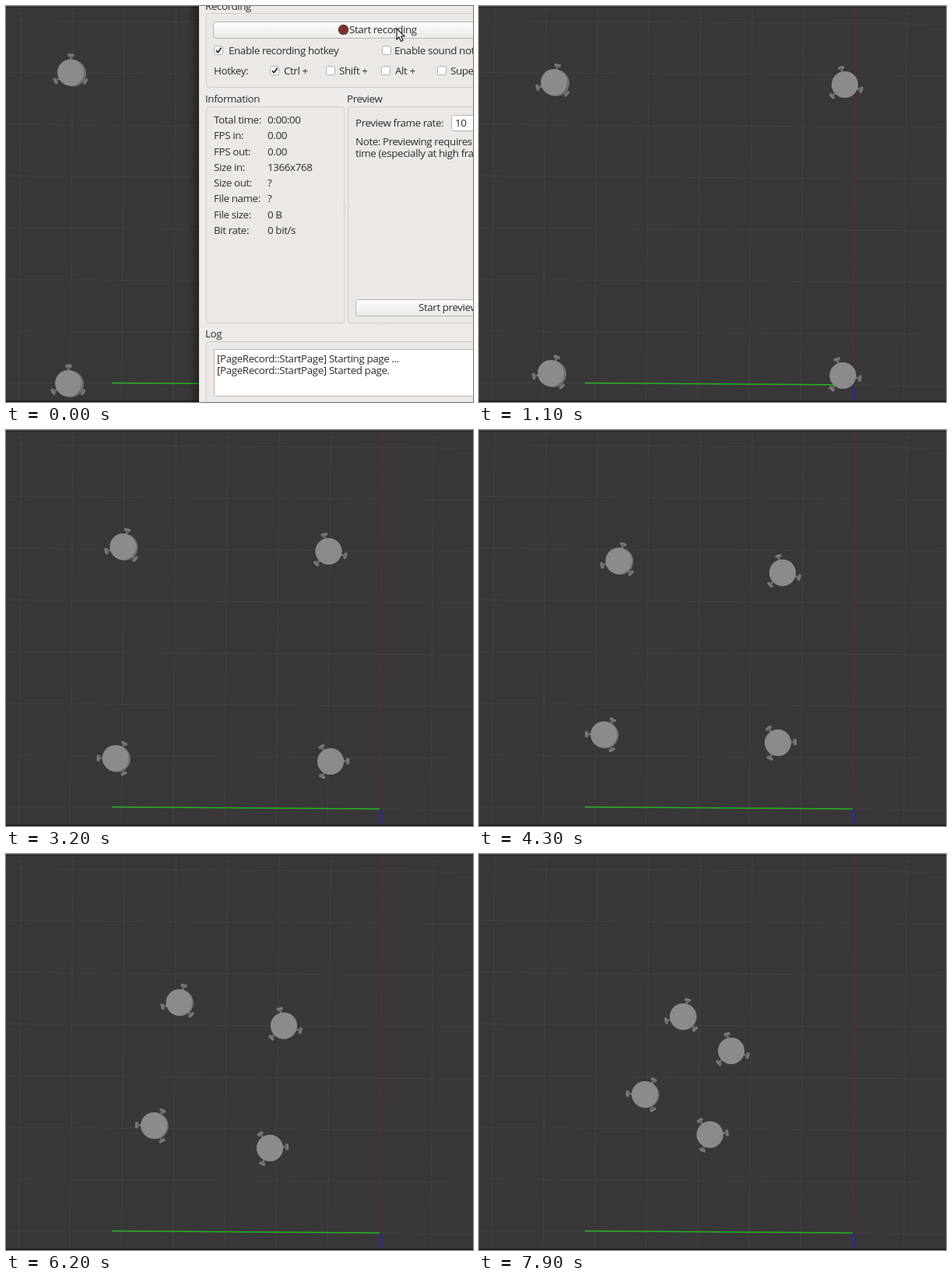
These frames come from a looping animation (600 px wide and 509 px high, 8000 ms). An HTML page with a canvas:

```html
<!DOCTYPE html>
<html lang="en">
<head>
<meta charset="utf-8">
<title>Robots converging</title>
<style>
html, body { margin: 0; width: 100%; height: 100%; overflow: hidden; background: #393739; }
canvas { display: block; }
</style>
</head>
<body>
<canvas id="stage" width="600" height="509"></canvas>
<script>
const ctx = document.getElementById('stage').getContext('2d');
const W = 600, H = 509, LOOP = 8000, STEP = 100;
const DIALOG_END = 100;

// Waypoints: x, y, heading in degrees at each key time
const TIMES = [0, 900, 1100, 1900, 3200, 4300, 6200, 7900];
const ROBOTS = [
  [[83, 85.5, -89], [92, 94, -80], [96.3, 98, -78], [114.3, 115.3, -76],
   [150.3, 150, -75], [179.5, 168.3, -75], [222.5, 190.7, -74], [262, 209, -74]],
  [[483, 87, -90], [474, 97, -101], [470, 101, -102], [451.5, 118, -103.5],
   [414.5, 156, -105], [390, 183.5, -104], [357, 220.7, -103.5], [324, 253, -104]],
  [[80, 485, -89], [88, 476, -74], [92.3, 472, -70], [107.3, 457, -61],
   [140.7, 422, -59], [160.3, 391.5, -58.5], [190, 349, -58.5], [213, 309, -58]],
  [[480, 487, -90], [471.5, 479, -106], [467.5, 475, -110], [453.5, 460, -118.5],
   [417, 426, -121], [384, 402, -122.5], [339, 378, -124], [296.5, 360.5, -125]]
];

function slope(path, i, k) {
  if (i === 0) return 0;
  const j = Math.min(i + 1, path.length - 1);
  return (path[j][k] - path[i - 1][k]) / (TIMES[j] - TIMES[i - 1]);
}

// Cubic Hermite through the waypoints
function poseAt(path, t) {
  let i = 0;
  while (i < TIMES.length - 2 && t >= TIMES[i + 1]) i++;
  const d = TIMES[i + 1] - TIMES[i];
  const u = Math.min(1, (t - TIMES[i]) / d), u2 = u * u, u3 = u2 * u;
  return [0, 1, 2].map(k =>
    (2 * u3 - 3 * u2 + 1) * path[i][k] + (u3 - 2 * u2 + u) * d * slope(path, i, k) +
    (3 * u2 - 2 * u3) * path[i + 1][k] + (u3 - u2) * d * slope(path, i + 1, k));
}

function line(x1, y1, x2, y2, color, width = 1) {
  ctx.strokeStyle = color;
  ctx.lineWidth = width;
  ctx.beginPath();
  ctx.moveTo(x1, y1);
  ctx.lineTo(x2, y2);
  ctx.stroke();
}

function disc(x, y, r, color) {
  ctx.fillStyle = color;
  ctx.beginPath();
  ctx.arc(x, y, r, 0, Math.PI * 2);
  ctx.fill();
}

function box(x, y, w, h, r, fill, stroke) {
  ctx.beginPath();
  ctx.roundRect(x + 0.5, y + 0.5, w, h, r);
  if (fill) { ctx.fillStyle = fill; ctx.fill(); }
  if (stroke) { ctx.strokeStyle = stroke; ctx.lineWidth = 1; ctx.stroke(); }
}

function drawFloor() {
  ctx.fillStyle = '#393739';
  ctx.fillRect(0, 0, W, H);
  for (let i = 0; i < 9; i++) {
    const x = 20 + i * 66.2;
    if (i !== 7) line(x, 0, x - 4, H, '#424042');
  }
  for (let i = 0; i < 8; i++) {
    const y = 19 + i * 66.45;
    line(0, y, W, y + 4.4, '#424042');
  }
  line(484, 0, 480, 487, '#6c292c', 1.1);
  line(480, 488, 482.5, H, '#2a27a0', 2);
  line(136, 484.5, 480, 487, '#25b325', 1.3);
  ctx.fillStyle = '#5a585a';
  ctx.fillRect(0, 0, W, 1);
  ctx.fillStyle = '#211f21';
  ctx.fillRect(0, 1, W, 1);
  ctx.fillRect(0, H - 2, W, 2);
}

function drawRobot([x, y, heading]) {
  for (let i = 0; i < 3; i++) {
    ctx.save();
    ctx.translate(x, y);
    ctx.rotate((heading + i * 120) * Math.PI / 180);
    line(14, 0, 21, 0, '#767476', 2.4);
    ctx.fillStyle = '#6a686a';
    ctx.beginPath();
    ctx.roundRect(19.8, -4.2, 4.4, 8.4, 1.4);
    ctx.fill();
    ctx.fillStyle = '#828082';
    ctx.fillRect(22, -3.7, 1.6, 7.4);
    ctx.restore();
  }
  const side = Math.max(0, (340 - x) / 85);
  disc(x + side, y + side * 0.35, 17, '#6f6d6f');
  disc(x, y, 17, '#8c8a8c');
}

function text(s, x, midY) {
  ctx.fillStyle = '#2f2d2b';
  ctx.fillText(s, x, midY + 5);
}

function checkbox(x, y, label, labelX, on) {
  box(x, y - 6, 11, 11, 2, '#fff', '#b3aea9');
  if (on) {
    line(x + 3, y, x + 5.3, y + 3, '#2a2826', 1.8);
    line(x + 5.3, y + 3, x + 9.5, y - 3.5, '#2a2826', 1.8);
  }
  text(label, labelX, y);
}

function button(x, y, w, h) {
  const g = ctx.createLinearGradient(0, y, 0, y + h);
  g.addColorStop(0, '#fefefe');
  g.addColorStop(1, '#ece9e6');
  box(x, y, w, h, 3, g, '#b9b4af');
}

function drawCursor(x, y) {
  const pts = [[0, 0], [0, 14], [3, 11], [5.5, 16.5], [8, 15.3], [5.7, 10], [10, 10]];
  ctx.beginPath();
  pts.forEach(([px, py]) => ctx.lineTo(x + px, y + py));
  ctx.closePath();
  ctx.fillStyle = '#f6f4f4';
  ctx.strokeStyle = '#222';
  ctx.lineWidth = 1.2;
  ctx.fill();
  ctx.stroke();
}

const INFO = [
  ['Total time:', '0:00:00'], ['FPS in:', '0.00'], ['FPS out:', '0.00'],
  ['Size in:', '1366x768'], ['Size out:', '?'], ['File name:', '?'],
  ['File size:', '0 B'], ['Bit rate:', '0 bit/s']
];

function drawDialog() {
  const left = 248;
  const shade = ctx.createLinearGradient(left - 14, 0, left, 0);
  shade.addColorStop(0, 'rgba(0,0,0,0)');
  shade.addColorStop(1, 'rgba(0,0,0,.35)');
  ctx.fillStyle = shade;
  ctx.fillRect(left - 14, 0, 14, H);
  ctx.fillStyle = '#edeae8';
  ctx.fillRect(left, 0, W - left, H);

  const edge = '#d2cdc9', panel = '#ebe8e5';
  box(257, 9, 400, 95, 3, panel, edge);
  box(257, 129, 177, 278, 3, panel, edge);
  box(439, 129, 220, 278, 3, panel, edge);
  box(257, 431, 400, 100, 3, panel, edge);

  ctx.font = '13.4px "Open Sans", "Noto Sans", sans-serif';
  ctx.letterSpacing = '-0.4px';
  text('Recording', 256, 0);
  text('Information', 256, 119);
  text('Preview', 438, 119);
  text('Log', 256, 421);

  button(266, 20, 400, 21);
  disc(433.5, 30.5, 6.8, '#64403e');
  disc(433.5, 30.5, 4.8, '#7d2f30');
  text('Start recording', 441, 30);
  checkbox(267, 57, 'Enable recording hotkey', 286, true);
  checkbox(483, 57, 'Enable sound notifications', 499, false);
  text('Hotkey:', 267, 83);
  checkbox(339, 83, 'Ctrl +', 357, true);
  checkbox(411, 83, 'Shift +', 428, false);
  checkbox(482, 83, 'Alt +', 500, false);
  checkbox(554, 83, 'Super +', 571, false);

  INFO.forEach(([name, value], i) => {
    const y = 146 + i * 20.25;
    text(name, 267, y);
    text(value, 336, y);
  });

  text('Preview frame rate:', 449, 150);
  box(572, 140, 60, 20, 3, '#fff', '#b9b4af');
  text('10', 577, 150);
  text('Note: Previewing requires extra CPU', 449, 174);
  text('time (especially at high frame rates).', 449, 189);
  button(449, 377, 200, 21);
  text('Start preview', 530, 387);

  box(267, 441, 400, 60, 2, '#fff', '#bdb8b3');
  text('[PageRecord::StartPage] Starting page ...', 271, 453);
  text('[PageRecord::StartPage] Started page.', 271, 468);

  ctx.fillStyle = '#c9c4c0';
  for (let i = 0; i < 5; i++) {
    ctx.fillRect(436, 255 + i * 3, 1, 1);
    ctx.fillRect(475 + i * 3, 409, 1, 1);
  }
  drawCursor(502, 29);
}

function draw(t) {
  drawFloor();
  ROBOTS.forEach(path => drawRobot(poseAt(path, t)));
  if (t < DIALOG_END) drawDialog();
}

let start = null;
function tick(now) {
  if (start === null) start = now;
  const t = Math.max(0, now - start) % LOOP;
  draw(Math.floor(t / STEP) * STEP);
  requestAnimationFrame(tick);
}
draw(0);
requestAnimationFrame(tick);
</script>
</body>
</html>
```
